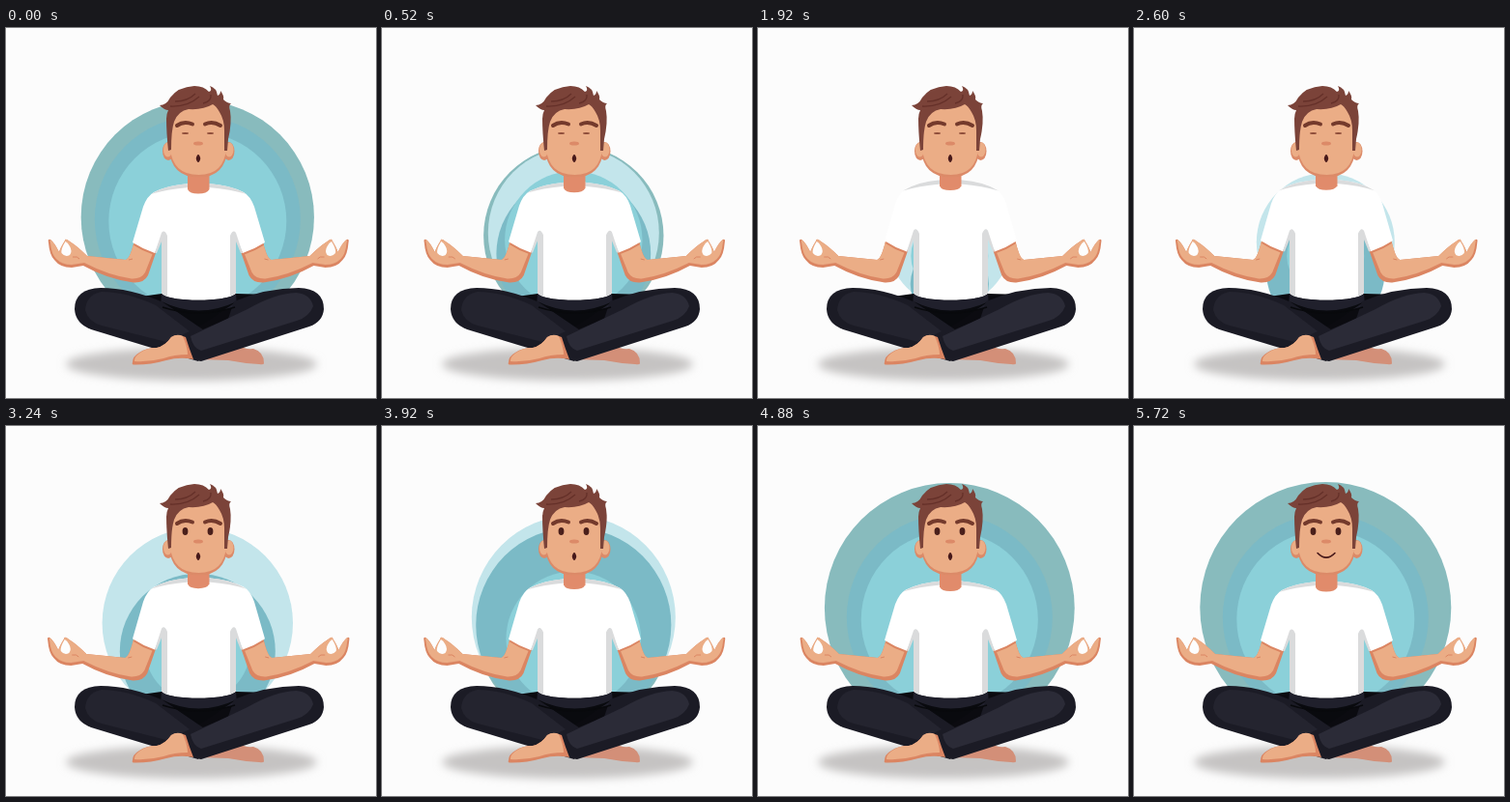
An HTML page for the animation above (6000 ms loop, 383 by 383 pixels).

```html
<!DOCTYPE html>
<html lang="en">
<head>
<meta charset="utf-8">
<title>Breathing exercise</title>
<style>
html, body { margin: 0; width: 100%; height: 100%; overflow: hidden; background: #fcfcfc; }
svg { display: block; width: 100%; height: 100%; }
</style>
</head>
<body>
<svg viewBox="0 0 383 383">
  <defs>
    <filter id="soft" x="-20%" y="-60%" width="140%" height="220%"><feGaussianBlur stdDeviation="5"/></filter>
    <g id="arm">
      <path fill="#db8562" d="M134 216C130 232 128 238 124 240L84 236Q74 226 66 221Q61 217 61 220Q56 228 55 232Q50 222 46 219Q43 218 44 222Q45 235 50 240Q56 248 68 248L80 246Q105 260 132 263.5Q143 264 147 256L156 230Z"/>
      <path fill="#ebad86" d="M134 216C130 232 128 238 124 240L84 236Q74 226 66 221Q61 217 61 220Q56 228 55 232Q50 222 46 219Q45 219 46 223Q47 234 52 239Q58 245 68 245L81 243Q106 256 130 259.5Q140 260 144 253L154 228Z"/>
      <path fill="#fdfdfd" d="M61.5 221Q56.5 229 57.5 233Q61 237.500 66 235Q69 231 66 226Q64 222 61.5 221Z"/>
      <path fill="none" stroke="#db8562" d="M69 237Q74 236 76 239M127 240L131 239"/>
    </g>
    <g id="sleeve">
      <path fill="none" stroke="#db8562" stroke-width="4" d="M133 223Q142 229 153 232.5"/>
      <path fill="#fff" d="M190 161Q168 162.500 153 170Q146 174 142 185L131 222Q142 229 154 233L162 213V190L199 190V161Z"/>
      <path fill="#dadbdc" d="M154 233L161 212Q164 208 167 215V280H161V221L156 233ZM189 161Q164 163 150 172Q166 167 189 165Z"/>
    </g>
  </defs>

  <ellipse cx="192" cy="348" rx="130" ry="17" fill="#c5c3c2" filter="url(#soft)"/>
  <g id="rings"></g>

  <use href="#arm" class="arm"/>
  <use href="#arm" class="arm"/>

  <g id="torso">
    <path fill="#fff" d="M188 161H211L238 180V284H161V180Z"/>
    <use href="#sleeve"/>
    <use href="#sleeve" transform="matrix(-1 0 0 1 399 0)"/>
    <path fill="#e18b6b" d="M188 146H210.5V167Q208 171.5 199 171.5Q190 171.5 188 167Z"/>
  </g>

  <!-- legs and feet -->
  <path fill="#d38f78" d="M200 343L239 328Q247 333 256 332Q267 335 267 347Q267 349 262 348Q245 347 230 344Z"/>
  <path fill="#0b0b10" d="M161 275C168 284 230 284 238 275L275 276L225 309L193 318L125 280Z"/>
  <path fill="#20202c" d="M161 275C168 284 230 284 238 275L239 289Q200 297 160 289Z"/>
  <path fill="#1b1b25" d="M163 284Q128 269 98 269Q71 270 71 291Q72 306 88 312L144 329L199 345L208 315Z"/>
  <path fill="#24242f" d="M155 287Q125 273 99 273Q83 276 82 292Q85 304 99 308L166 325L190 314Z"/>
  <path fill="#090a0e" d="M161 283Q199 302 239 283L200 309Z"/>
  <path fill="#1b1b25" d="M236 283Q270 269 303 269Q329 270 329 291Q328 304 314 309L202 345Q190 344 187 319L230 301Z"/>
  <path fill="#2b2b37" d="M191 319L250 291Q278 275 300 274Q315 275 318 288Q314 299 301 303L202 334Q193 331 191 319Z"/>
  <path fill="none" stroke="#08090c" stroke-width="1.5" d="M162 289Q199 301 237 289"/>
  <path fill="#db8562" d="M131 346Q131 340 138 336Q145 331 156 331Q165 329 171 320Q177 316 186 320Q190 333 194 343Q180 340 166 344Q148 349 132 348.5Q130 348 131 346Z"/>
  <path fill="#ebad86" d="M133 344Q133 340 139 336Q146 331 156 331Q165 329 171 320Q177 316 183 319Q188 330 188 338Q174 338 163 342Q148 346 133 345Z"/>

  <!-- head -->
  <g fill="#dc8a68">
    <ellipse cx="168" cy="127.5" rx="6" ry="9.5"/>
    <ellipse cx="230.5" cy="127.5" rx="6" ry="9.5"/>
    <path d="M169 92H229V126Q227 154.500 199.500 154.500Q171 154.500 169 126Z"/>
  </g>
  <g fill="#ebad86">
    <ellipse cx="167.5" cy="126" rx="4.5" ry="7.5"/>
    <ellipse cx="231" cy="126" rx="4.5" ry="7.5"/>
    <path d="M170 78H228V124Q226 152 199.500 152Q172 152 170 124Z"/>
  </g>
  <path fill="#7b4339" d="M168 127Q166 108 166 94Q166 89 168 85Q164 85 159 80Q166 80 170 72Q178 61 195 60Q205 60 210 66Q214 65 211 60Q218 62 219 70Q222 69 222 65Q226 70 225 74Q229 78 233 78Q230 80 232 86Q234 98 230 115L229 127H226V106Q226 95 221 87Q217 80 214 79Q204 85 189 84Q178 86 174 97Q171 106 171 126Z"/>
  <path fill="none" stroke="#653029" stroke-width="1.3" d="M170 81Q188 82 200 71M175 76Q188 76 196 68M204 78Q213 76 212 69"/>
  <path fill="none" stroke="#743a2c" stroke-width="4" stroke-linecap="round" d="M177 101Q184 96 193 99.500M206 99.500Q214 96 222 101"/>
  <ellipse cx="199" cy="119.5" rx="5" ry="2" fill="#dc8a68"/>
  <ellipse class="eye" cx="185.5" cy="109"/>
  <ellipse class="eye" cx="211.5" cy="109"/>
  <path id="mouth" fill="#47191a" stroke="#47191a" stroke-width="1.5" stroke-linecap="round" stroke-linejoin="round"/>
</svg>
<script>
const LOOP = 6000, STEP = 40, LAST = 5720;
const EXHALED = 1300, INHALED = 5120, WAIST = 283;
const mix = (a, b, k) => a + (b - a) * k;
const progress = (t, from, to) => Math.min(1, Math.max(0, (t - from) / (to - from)));

// Rings empty together on the exhale, then fill one after another (back to front).
const rings = [
  { fill: "#88bbbd", first: 0.88, small: 52, full: 130, low: 232, high: 188, begin: 2300, end: 4900 },
  { fill: "#c3e5eb", first: 1, small: 63, full: 105.5, low: 224, high: 198, begin: 2400, end: 3400 },
  { fill: "#7bbac6", first: 1, small: 40, full: 106.5, low: 265, high: 198, begin: 1900, end: 4100 },
  { fill: "#8bd0d9", first: 1, small: 40, full: 92, low: 236, high: 200, begin: 2600, end: 4900 }
];

const holder = document.getElementById("rings");
for (const ring of rings) {
  ring.node = document.createElementNS(holder.namespaceURI, "circle");
  ring.node.setAttribute("cx", 198.3);
  ring.node.setAttribute("fill", ring.fill);
  holder.append(ring.node);
}
const arms = document.querySelectorAll(".arm");
const eyes = document.querySelectorAll(".eye");
const torso = document.getElementById("torso");
const mouth = document.getElementById("mouth");

function draw(t) {
  for (const ring of rings) {
    const k = t < EXHALED
      ? ring.first * (1 - t / EXHALED)
      : progress(t, ring.begin, ring.end);
    ring.node.setAttribute("r", mix(ring.small, ring.full, k));
    ring.node.setAttribute("cy", mix(ring.low, ring.high, k ** 1.5));
  }

  // The chest lifts and settles once per breath, with the hands drifting outwards.
  const lift = Math.sin(Math.PI * progress(t, 0, INHALED));
  const stretch = 1 + 0.033 * lift;
  torso.setAttribute("transform", `matrix(1 0 0 ${stretch} 0 ${WAIST * (1 - stretch)})`);
  arms[0].setAttribute("transform", `translate(${-0.8 * lift} 0)`);
  arms[1].setAttribute("transform", `matrix(-1 0 0 1 ${398.5 + 0.8 * lift} 0)`);

  const open = progress(t, 2600, 3200);
  for (const eye of eyes) {
    eye.setAttribute("rx", mix(3.5, 2.9, open));
    eye.setAttribute("ry", mix(1, 4, open));
    eye.setAttribute("fill", `rgb(${mix(142, 74, open)},${mix(77, 31, open)},${mix(58, 27, open)})`);
  }

  const smile = progress(t, INHALED, LAST);
  const w = mix(1.5, 9, smile), y = mix(135, 131.5, smile);
  const top = mix(128.5, 140.5, smile), bottom = mix(141.5, 141, smile);
  mouth.setAttribute("d", `M${199 - w} ${y}Q199 ${top} ${199 + w} ${y}Q199 ${bottom} ${199 - w} ${y}Z`);
}

let start;
function tick(now) {
  start ??= now;
  const t = (now - start) % LOOP;
  draw(Math.min(LAST, Math.floor(t / STEP) * STEP));
  requestAnimationFrame(tick);
}
draw(0);
requestAnimationFrame(tick);
</script>
</body>
</html>
```
